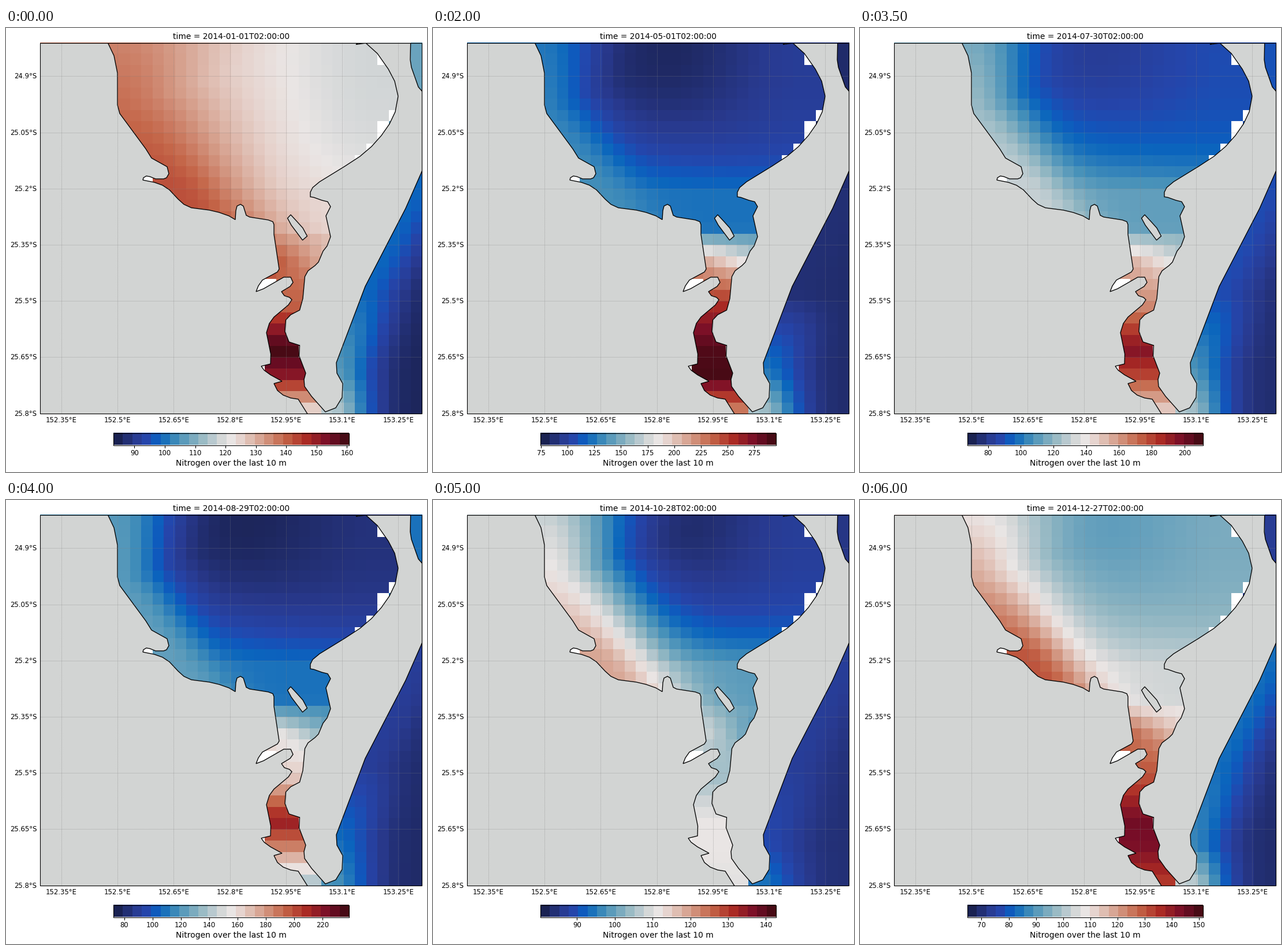
A matplotlib script that plays this animation: 729 px wide and 768 px high, repeating every 6.5 s.

```python
import numpy as np
import matplotlib.pyplot as plt
from matplotlib.animation import FuncAnimation
from matplotlib.colors import LinearSegmentedColormap
from matplotlib.patches import Polygon, Rectangle

WIDTH, HEIGHT, DPI = 729, 768, 100
FRAMES, INTERVAL = 13, 500
LEFT, RIGHT, TOP, BOTTOM = 59.3, 720.6, 25.2, 666.6
COLS, ROWS = 34, 33
BAR_LEFT, BAR_RIGHT, BAR_TOP, BAR_BOTTOM = 186.5, 594.0, 701.0, 721.5
LEVELS = 25
LAND = "#d2d4d3"
SMALL = 8.33

# Diverging blue - grey - red scale
ANCHORS = [
    (0, (23, 28, 66)), (.0909, (41, 58, 143)), (.14, (37, 70, 172)),
    (.175, (16, 88, 189)), (.2, (11, 102, 189)), (.2727, (69, 144, 185)),
    (.3636, (142, 181, 194)), (.4545, (210, 214, 215)), (.5, (234, 230, 229)),
    (.5455, (230, 210, 204)), (.6364, (213, 157, 137)), (.7273, (196, 101, 72)),
    (.8182, (172, 43, 36)), (.9091, (120, 14, 40)), (1, (60, 9, 17)),
]
scale = LinearSegmentedColormap.from_list(
    "scale", [(p, np.array(c) / 255) for p, c in ANCHORS], N=1024)


def shade(level):
    return scale((np.clip(level, 0, LEVELS - 1) + .5) / LEVELS)


# Coastlines in stage pixels, closed outside the map window
MAINLAND = [
    (40, 10), (170, 10), (176, 25), (187, 48), (193, 78), (193, 133),
    (197, 148), (242, 209), (252, 225), (279, 240), (282, 252), (278, 259),
    (273, 261), (259, 261), (249, 257), (243, 256), (238, 259), (237, 263),
    (257, 267), (271, 272), (283, 280), (298, 296), (308, 305), (321, 311),
    (352, 315), (369, 319), (386, 325), (397, 331.5), (398, 316), (400, 308),
    (406, 305), (411, 308), (416, 324), (422, 327), (454, 332), (462, 335),
    (464, 340), (464, 357), (473, 417), (470, 422), (444, 436), (437, 446),
    (433, 456), (446, 451), (481, 431), (493, 431), (497, 440), (492, 447),
    (477, 456), (482, 463), (491, 466), (495, 470), (489, 479), (464, 500),
    (456, 511), (451, 527), (458.5, 564), (458, 581), (442, 585), (447, 592),
    (458, 600), (478, 611), (464, 615), (470, 627), (480, 635), (493, 640),
    (506, 642), (533, 685), (40, 685),
]
ISLAND = [
    (612, 10), (611, 25), (606, 28.5), (623, 26), (643, 44), (662, 71),
    (673, 92), (679, 118), (674, 145), (664, 166), (650, 186), (633, 205),
    (613, 222), (587, 239), (543, 266), (531, 276), (527, 284), (527, 292),
    (533, 293), (547, 298), (557, 300.5), (562, 309), (554, 325), (562, 361),
    (556, 377), (549, 386), (541, 405), (535, 411), (523, 420), (517.5, 430),
    (514, 468), (508.5, 488), (493, 496), (484.5, 505), (483, 525), (490, 543),
    (508.5, 549), (507.5, 567), (519, 597), (516, 608), (517, 620), (529, 637),
    (553, 664), (571, 657), (582, 639), (583, 615), (573, 597), (572, 579),
    (622, 447), (692, 312), (720.6, 247), (735, 214), (735, 126), (714, 102),
    (702, 68), (700, 55), (701, 10),
]
ISLET = [(493, 323), (487.5, 329), (494, 341), (513.5, 367), (521.5, 360),
         (514, 346), (505, 336)]

# Cells without data: (row, column)
EMPTY = [(1, 30), (1, 31), (6, 31), (7, 30), (8, 30), (9, 29), (10, 28),
         (11, 9), (12, 9), (21, 20), (22, 20), (27, 23)]

steps, seasons = [], []


def season(step, limits, bay, strait, sea):
    """Describe one time step; levels run from 0 (blue) to 24 (dark red).

    bay: shore north, shore south, core, east, south, reach of the shore
    strait: levels from the neck down to the tail
    sea: north-east corner, north coast, south coast, tail, deep water
    """
    steps.append(step)
    seasons.append([*limits, *bay, *strait, *sea])


season(0, (83.15, 160.7), (16.5, 18.5, 12, 10.8, 12.6, 185),
       (17, 17.8, 24.3, 21.5, 13.3), (7.5, 4.5, 7, 10, .2))
season(2, (73.7, 201.9), (11, 14.8, 1.7, 8.6, 8.8, 105),
       (13.5, 16.5, 23.7, 21.8, 12.3), (1.5, 1.8, 5.5, 8, .5))
season(4, (74.7, 295.6), (5.2, 6.2, .4, 2.1, 5, 95),
       (14.5, 20, 23.7, 24, 17), (.7, 1, 5.5, 9.5, .7))
season(5, (57.7, 156.5), (10.2, 17, 5.8, 7.5, 11.6, 105),
       (19, 21.5, 23.5, 24, 21), (.8, 5.5, 10.5, 16, 1.2))
season(8, (72.5, 238.8), (6.8, 7.2, .2, 1.2, 5, 100),
       (11.3, 13.5, 21, 16.5, 10), (5, 2.2, 5, 6.5, .6))
season(10, (80.4, 142.7), (10.6, 15, .3, 2.2, 7, 140),
       (9.5, 9.3, 12, 12, 11.7), (1.5, 2.2, 3.2, 5.2, 1))
season(12, (64.9, 151.5), (12.4, 18.3, 7, 8, 10.8, 125),
       (16.5, 18.5, 22.5, 22, 19.5), (2, 4.8, 6, 10.5, .7))


def at_step(step):
    """Blend the seasons linearly; returns limits, bay, strait and sea."""
    row = [np.interp(step, steps, column) for column in zip(*seasons)]
    return row[:2], row[2:8], row[8:13], row[13:]


def ramp(value, start, end):
    return np.clip((value - start) / (end - start), 0, 1)


def mix(a, b, t):
    return a + (b - a) * t


cell_x = LEFT + (np.arange(COLS) + .5) * (RIGHT - LEFT) / COLS
cell_y = TOP + (np.arange(ROWS) + .5) * (BOTTOM - TOP) / ROWS
X, Y = np.meshgrid(cell_x, cell_y)
is_sea = X > 706 - .257 * (Y - TOP)
is_empty = np.zeros((ROWS, COLS), bool)
is_empty[tuple(zip(*EMPTY))] = True
is_empty[20:, 19] = True


def bay_level(shore_north, shore_south, core, east, south, reach):
    eastward = ramp(X, 400, 640)
    eastward = eastward ** 2 * (3 - 2 * eastward)
    southward = ramp(Y, 35, 285) ** 2
    southward = southward * (1 - .8 * eastward * (1 - southward))
    open_water = mix(mix(core, east, eastward), south, southward)
    along = ramp(Y, 35, 270)
    offshore = np.minimum(X - 193, .817 * (X - 193) - .577 * (Y - 140))
    offshore = np.maximum(offshore, 0)
    near = np.exp(-(offshore / (reach * (1 - .4 * along))) ** 2)
    return mix(open_water, mix(shore_north, shore_south, along), near)


def strait_level(knots):
    tilt = .05 * (X - 500) * np.exp(-((Y - 395) / 35) ** 2)
    return np.interp(Y, [410, 480, 555, 600, 657], knots) - tilt


def sea_level(corner, north, south, tail, deep):
    coast = np.interp(Y, [270, 460, 600, 657], [north, north, south, tail])
    coast_x = np.interp(Y, [247, 447, 580, 657], [720, 622, 572, 560])
    near = np.exp(-(np.maximum(X - coast_x, 0) / 70) ** 2)
    return np.where(Y < 180, corner, mix(deep, coast, near))


def field(step):
    _, bay, strait, sea = at_step(step)
    inshore = mix(bay_level(*bay), strait_level(strait), ramp(Y, 345, 410))
    rgba = shade(np.where(is_sea, sea_level(*sea), inshore))
    rgba[is_empty] = 1
    return rgba


def bar_ticks(low, high):
    gap = next(g for g in (10, 20, 25, 50) if (high - low) / g <= 9)
    values = np.arange(np.ceil(low / gap) * gap, high, gap)
    return values, BAR_LEFT + (values - low) / (high - low) * (BAR_RIGHT - BAR_LEFT)


plt.rcParams["font.family"] = "DejaVu Sans"
fig = plt.figure(figsize=(WIDTH / DPI, HEIGHT / DPI), dpi=DPI, facecolor="white")
ax = fig.add_axes([0, 0, 1, 1])
ax.axis("off")


def label(x, y, text="", size=SMALL, ha="center"):
    return ax.text(x, y, text, fontsize=size, ha=ha, va="baseline")


def frame(left, right, top, bottom):
    ax.add_patch(Rectangle((left, top), right - left, bottom - top,
                           fill=False, ec="black", lw=.8, zorder=5))


water = ax.imshow(field(0), extent=(LEFT, RIGHT, BOTTOM, TOP), aspect="auto",
                  interpolation="nearest")
ax.imshow(shade(np.arange(LEVELS))[None], aspect="auto", interpolation="nearest",
          extent=(BAR_LEFT, BAR_RIGHT, BAR_BOTTOM, BAR_TOP))
ax.set_xlim(0, WIDTH)
ax.set_ylim(HEIGHT, 0)

window = Rectangle((59.5, 25.5), 661, 641, transform=ax.transData)
for coast in (MAINLAND, ISLAND, ISLET):
    land = ax.add_patch(Polygon(coast, fc=LAND, ec="black", lw=.95, zorder=3))
    land.set_clip_path(window)

grid_style = dict(color="gray", lw=.5, alpha=.55, ls=(0, (2, 1)), zorder=4)
for i in range(7):
    x = 95.8 + 97.25 * i
    ax.plot([x, x], [TOP, BOTTOM], **grid_style)
    label(x, 682.3, f"{152.35 + .15 * i:.2f}".rstrip("0") + "°E")
    y = 83.4 + 97.2 * i
    if i < 6:
        ax.plot([LEFT, RIGHT], [y, y], **grid_style)
    label(53.5, y + 4, f"{24.9 + .15 * i:.2f}".rstrip("0") + "°S", ha="right")

frame(59.5, 720.5, 25.5, 666.5)
frame(186.5, 594, 701, 721.5)
title = label(390, 19.2, size=10)
label(390.3, 757.3, "Nitrogen over the last 10 m", size=10)
ticks = [(ax.plot([], [], color="black", lw=.8)[0], label(0, 739))
         for _ in range(10)]


def update(step):
    water.set_data(field(step))
    date = np.datetime64("2014-01-01T02:00:00") + np.timedelta64(30 * int(step), "D")
    title.set_text(f"time = {date}")
    values, places = bar_ticks(*at_step(step)[0])
    for i, (mark, text) in enumerate(ticks):
        shown = i < len(values)
        mark.set_visible(shown)
        text.set_visible(shown)
        if shown:
            mark.set_data([places[i]] * 2, [BAR_BOTTOM, BAR_BOTTOM + 4.8])
            text.set_x(places[i])
            text.set_text(f"{values[i]:.0f}")
    return [water, title]


anim = FuncAnimation(fig, update, frames=FRAMES, interval=INTERVAL,
                     repeat=True, repeat_delay=0, blit=False)
plt.show()
```
